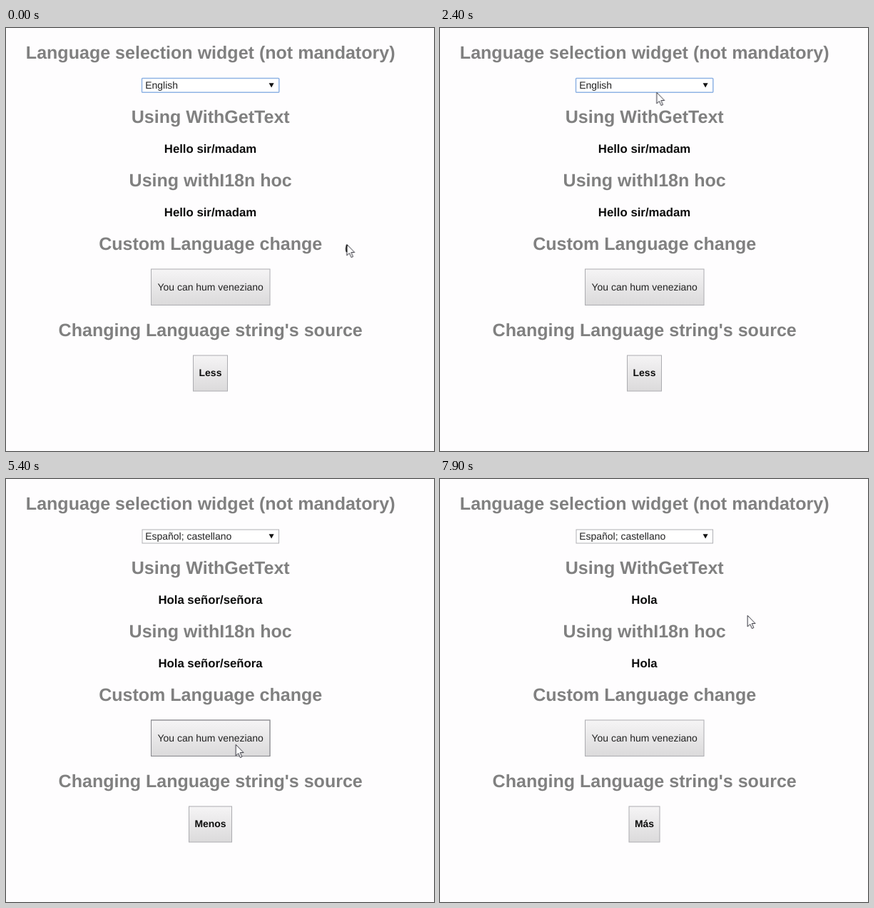
Recreate the animation shown at these times as an HTML page. Size 600 by 593 pixels, loop 8 s.

```html
<!DOCTYPE html>
<html lang="en">
<head>
<meta charset="utf-8">
<title>Language switcher demo</title>
<style>
  html, body { margin: 0; width: 100%; height: 100%; overflow: hidden; background: #fefdfe; }
  svg { display: block; width: 100%; height: 100%; }
  text {
    font-family: "Liberation Sans", Arial, sans-serif;
    font-size: 13.95px;
    text-anchor: middle;
    text-rendering: geometricPrecision;
    fill: #0c0c0c;
  }
  .title text { font-size: 25.05px; font-weight: bold; fill: #808080; }
  .hello { font-size: 16.75px; font-weight: bold; }
  .toggle { font-weight: bold; }
  .choice { text-anchor: start; fill: #222; }
  .box { fill: url(#face); stroke: #acacb0; }
  .hot { fill: none; stroke: #85858a; }

  /* Hard switches */
  .en, .fr, .es, .menos, .mas, .focus, .hot, .ring, .pointer, .mark {
    animation: 8s step-end infinite;
  }
  .en { animation-name: en; }
  .fr { animation-name: fr; }
  .es { animation-name: es; }
  .menos { animation-name: menos; }
  .mas { animation-name: mas; }
  .focus { animation-name: focus; }
  .hot.custom { animation-name: hotCustom; }
  .hot.more { animation-name: hotMore; }
  .ring { animation-name: ring; }
  .pointer { animation-name: pointer; }
  .mark { animation-name: mark; }
  @keyframes en { 0% { opacity: 1 } 32.5%, 100% { opacity: 0 } }
  @keyframes fr { 0% { opacity: 0 } 32.5% { opacity: 1 } 63%, 100% { opacity: 0 } }
  @keyframes es { 0% { opacity: 0 } 63%, 100% { opacity: 1 } }
  @keyframes menos { 0% { opacity: 0 } 63% { opacity: 1 } 81.25%, 100% { opacity: 0 } }
  @keyframes mas { 0% { opacity: 0 } 81.25%, 100% { opacity: 1 } }
  @keyframes focus { 0% { opacity: 1 } 60%, 100% { opacity: 0 } }
  @keyframes hotCustom { 0% { opacity: 0 } 57% { opacity: 1 } 69.5%, 100% { opacity: 0 } }
  @keyframes hotMore { 0% { opacity: 0 } 81.25% { opacity: 1 } 91.5%, 100% { opacity: 0 } }
  @keyframes ring {
    0% { opacity: 0 } 60% { opacity: .7 } 65% { opacity: 0 }
    77.5% { opacity: .7 } 87.5%, 100% { opacity: 0 }
  }
  @keyframes pointer { 0% { opacity: 1 } 31% { opacity: 0 } 46.5%, 100% { opacity: 1 } }
  @keyframes mark { 0% { opacity: 1 } 1.25%, 100% { opacity: 0 } }

  .mouse { animation: travel 8s ease-in-out infinite; }
  @keyframes travel {
    0%, 1.25% { transform: translate(477.5px, 303px) }
    15%, 20% { transform: translate(306.5px, 77px) }
    28%, 46.5% { transform: translate(303.5px, 90px) }
    58%, 68.5% { transform: translate(321.8px, 372px) }
    76%, 90.5% { transform: translate(305.5px, 499.5px) }
    98.5%, 100% { transform: translate(430.8px, 191px) }
  }
</style>
</head>
<body>
<svg viewBox="0 0 600 593">
  <defs>
    <linearGradient id="face" x2="0" y2="1">
      <stop stop-color="#f5f4f5"/>
      <stop offset="1" stop-color="#dbdadb"/>
    </linearGradient>
  </defs>

  <g class="title">
    <text x="286.7" y="43.1">Language selection widget (not mandatory)</text>
    <text x="286.7" y="133">Using WithGetText</text>
    <text x="286.7" y="222.2">Using withI18n hoc</text>
    <text x="286.7" y="311">Custom Language change</text>
    <text x="286.7" y="431.7">Changing Language string's source</text>
  </g>

  <rect x="191" y="71" width="191.5" height="19" fill="#fff" stroke="#b0b0b4"/>
  <rect class="focus" x="190.5" y="70.5" width="192.3" height="19.8" rx="1" fill="#fff" stroke="#8fb3e4" stroke-width="1.5"/>
  <path d="M368.6 77.2h7l-3.5 6.3z" fill="#111"/>

  <rect class="box" x="203.5" y="338" width="166.5" height="50.5"/>
  <rect class="hot custom" x="203.5" y="338" width="166.5" height="50.5"/>
  <text x="286.7" y="367.8" style="fill:#222">You can hum veneziano</text>

  <g class="en">
    <text class="choice" x="195.3" y="85">English</text>
    <text class="hello" x="286.5" y="175">Hello sir/madam</text>
    <text class="hello" x="286.5" y="264">Hello sir/madam</text>
    <rect class="box" x="262.5" y="459" width="48" height="50"/>
    <text class="toggle" x="286.5" y="488">Less</text>
  </g>

  <g class="fr">
    <text class="choice" x="195.3" y="85">Français ; langue française</text>
    <text class="hello" x="286.5" y="175">Bonjour monsieur/madame</text>
    <text class="hello" x="286.5" y="264">Bonjour monsieur/madame</text>
    <rect class="box" x="258.5" y="459" width="56" height="50"/>
    <text class="toggle" x="286.5" y="488">Moins</text>
  </g>

  <text class="choice es" x="195.3" y="85">Español; castellano</text>

  <g class="menos">
    <text class="hello" x="286.5" y="175">Hola señor/señora</text>
    <text class="hello" x="286.5" y="264">Hola señor/señora</text>
    <rect class="box" x="256.5" y="459" width="60" height="50"/>
    <text class="toggle" x="286.5" y="488">Menos</text>
  </g>

  <g class="mas">
    <text class="hello" x="286.5" y="175">Hola</text>
    <text class="hello" x="286.5" y="264">Hola</text>
    <rect class="box" x="265" y="459" width="43" height="50"/>
    <rect class="hot more" x="265" y="459" width="43" height="50"/>
    <text class="toggle" x="286.5" y="488">Más</text>
  </g>

  <g class="mouse">
    <circle class="ring" cx="1" cy="-.5" r="33.2" fill="none" stroke="#f4434d" stroke-width="5.2"/>
    <g class="pointer">
      <path d="M.3 .3V16L3.9 12.6 6.5 18.6 9 17.5 6.4 11.6H11.2Z" fill="#fff" stroke="#33333c"/>
      <path class="mark" d="M.6 1Q-1.4 6 .2 11" fill="none" stroke="#111" stroke-width="2"/>
    </g>
  </g>
</svg>
</body>
</html>
```
